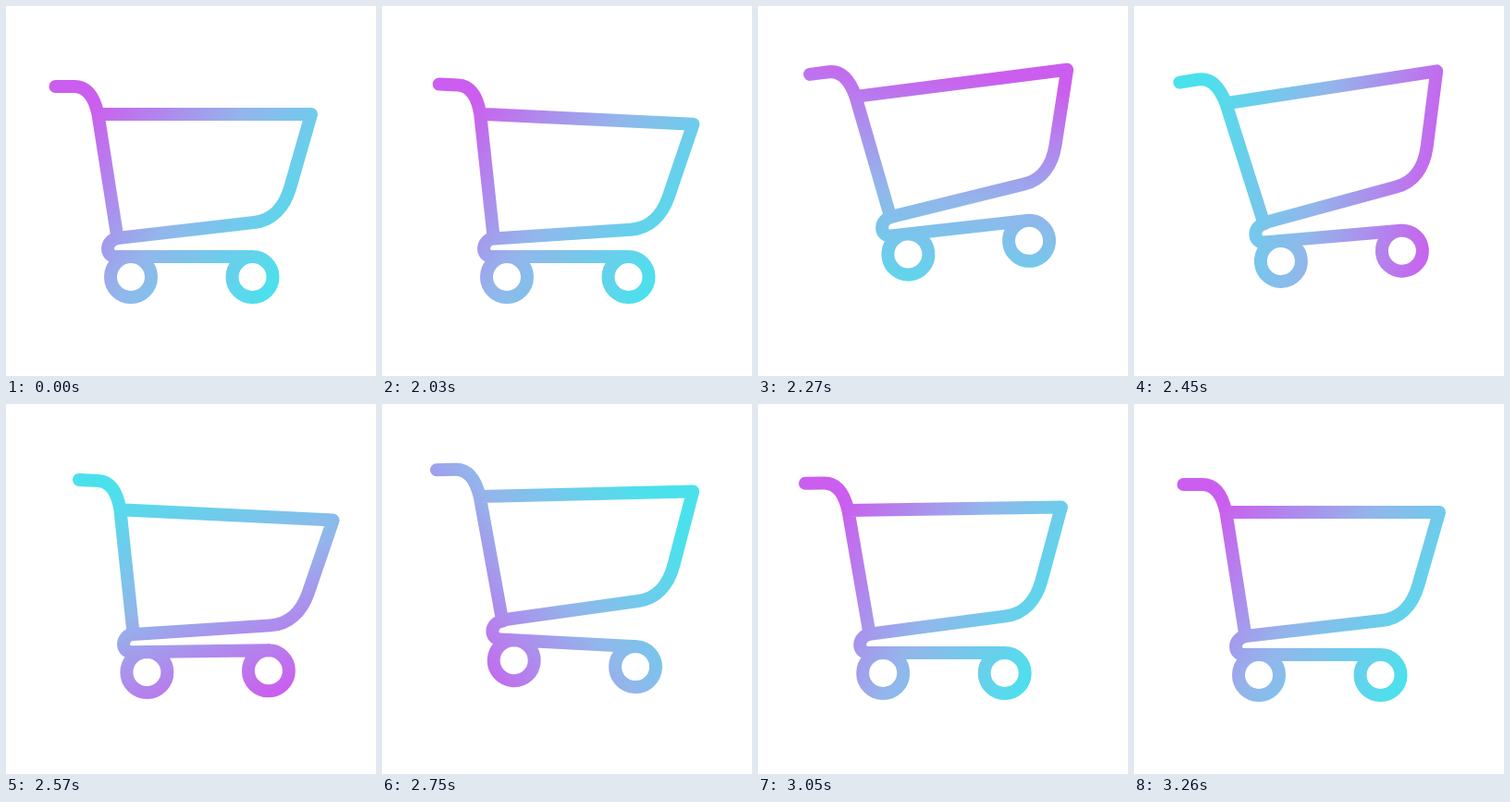
Recreate the animation shown at these times as an HTML page with a canvas. Size 400 by 400 pixels, loop 3320 ms.

```html
<!DOCTYPE html>
<html lang="en">
<head>
<meta charset="utf-8">
<title>Hopping cart</title>
<style>
  html, body { margin: 0; width: 100%; height: 100%; overflow: hidden; background: #fff; }
  canvas { display: block; width: 100vmin; height: 100vmin; }
</style>
</head>
<body>
<canvas width="400" height="400"></canvas>
<script>
const ctx = document.querySelector('canvas').getContext('2d');

const LOOP = 3320, HOLD = 2000, STEP = 30, LAST = 1260;
const AXLE = [200.75, 293];   // midpoint between the wheels
const HINGE = [108, 257];     // where the basket rocks on the base
const GRADIENT = { x: 195, y: 206, half: 137, angle: 35 };

const basket = new Path2D(
  'M53.5 87H74C89 87 96 101 99.5 117L120.5 251' +
  'M99.5 117H330L307 197C301 217 288 232 268 234L120.5 251');
const base = new Path2D('M121 251C107 253 106.5 271 119 271H267');
for (const x of [135, 266.5]) {
  base.moveTo(x + 22, 293);
  base.arc(x, 293, 22, 0, 2 * Math.PI);
}

const clamp = (v, low, high) => Math.min(high, Math.max(low, v));
const swing = u => (1 - Math.cos(Math.PI * u)) / 2;

// Swing with a quick start and a long settle.
const settle = (time, from, to) =>
  swing(1 - (1 - clamp((time - from) / (to - from), 0, 1)) ** 1.36);

// Swings from one turning point [time, value] to the next.
function sway(time, [from, ...rest]) {
  let value = from[1];
  for (const to of rest) {
    value += (to[1] - from[1]) * swing(clamp((time - from[0]) / (to[0] - from[0]), 0, 1));
    from = to;
  }
  return value;
}

const shiftX = t => 27.5 * (sway(t, [[60, 0], [290, 1]]) - settle(t, 290, 1150));
const shiftY = t => sway(t, [[60, 0], [325, -35.5], [625, -1], [770, -12.9], [1150, 0]]);
const pitch = t => sway(t, [[60, 0], [320, -7], [750, 3], [1050, 0]]);
const tilt = t => sway(t, [[-105, -6.3], [105, 6.3], [390, -5.2], [650, 6], [775, -5.5], [1150, 0]]);
const spin = t => 360 * settle(t, 0, LAST);

const turn = (matrix, [x, y], degrees) =>
  matrix.translate(x, y).rotate(degrees).translate(-x, -y);

function sweep(degrees) {
  const { x, y, half, angle } = GRADIENT;
  const a = (angle + degrees) * Math.PI / 180;
  const dx = half * Math.cos(a), dy = half * Math.sin(a);
  const paint = ctx.createLinearGradient(x - dx, y - dy, x + dx, y + dy);
  ['#cb5eee', '#92b6eb', '#4be1ec'].forEach((color, i) => paint.addColorStop(i / 2, color));
  return paint;
}

function draw(time) {
  const lower = turn(new DOMMatrix().translate(shiftX(time), shiftY(time)), AXLE, pitch(time));
  const upper = turn(lower, HINGE, tilt(time));
  const cart = new Path2D();
  cart.addPath(base, lower);
  cart.addPath(basket, upper);

  ctx.fillStyle = '#fff';
  ctx.fillRect(0, 0, 400, 400);
  ctx.lineWidth = 14;
  ctx.lineCap = ctx.lineJoin = 'round';
  ctx.strokeStyle = sweep(spin(time));
  ctx.stroke(cart);
}

const start = performance.now();
function tick() {
  const elapsed = (performance.now() - start) % LOOP - HOLD;
  draw(clamp(Math.floor(elapsed / STEP) * STEP, 0, LAST));
  requestAnimationFrame(tick);
}
tick();
</script>
</body>
</html>
```
